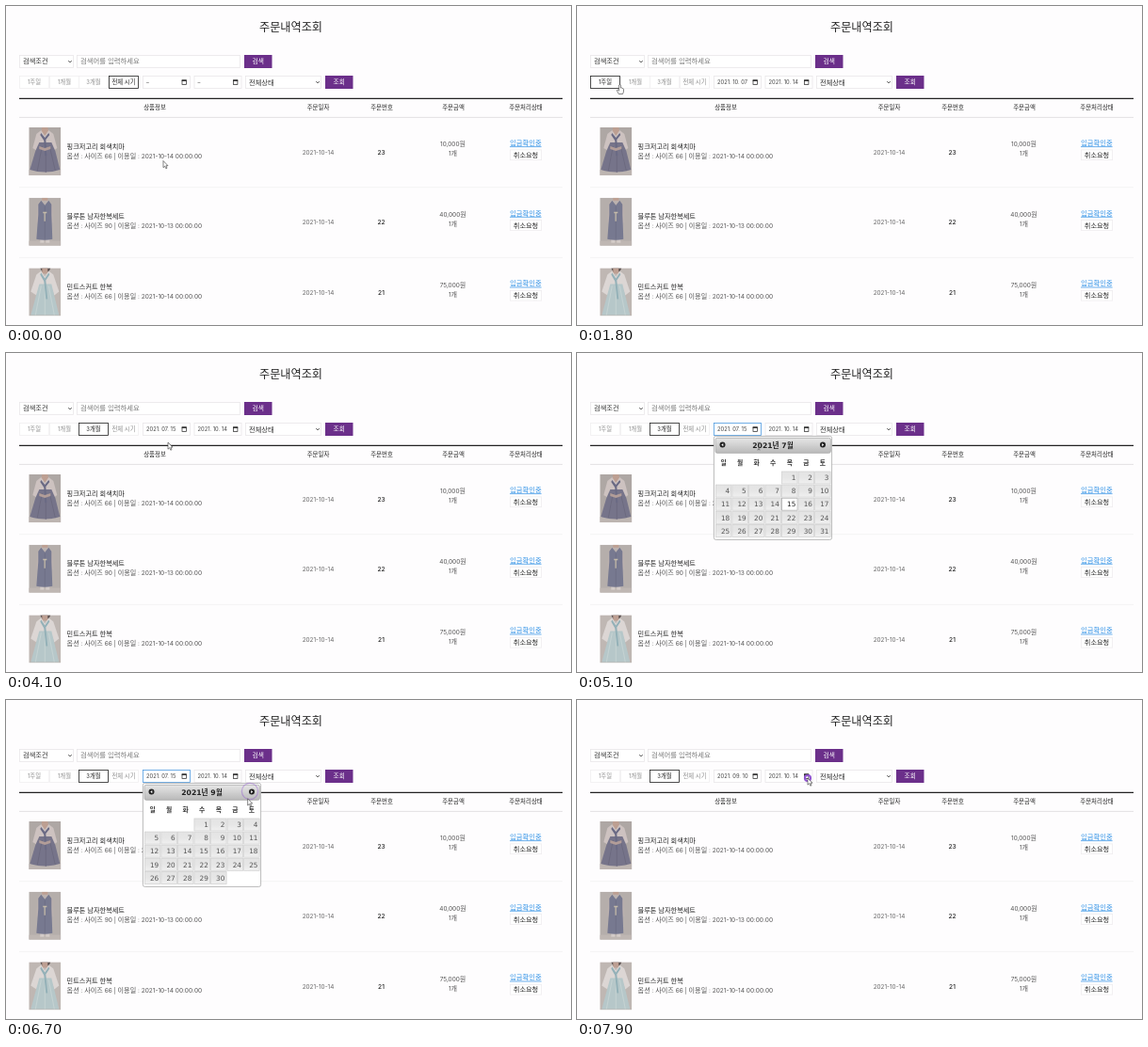
An HTML page for the animation above (8000 ms loop, 600 by 339 pixels).

```html
<!DOCTYPE html>
<html lang="ko">
<head>
<meta charset="utf-8">
<title>주문내역조회</title>
<style>
html, body { margin: 0; width: 100%; height: 100%; overflow: hidden; background: #fefdfe; }
svg { display: block; width: 100%; height: 100%; }
text { white-space: pre; font-family: "Noto Sans CJK KR", "Noto Sans CJK", sans-serif; }
.latin { font-family: Inter, "Noto Sans CJK KR", sans-serif; }
.cal, .cal .latin { font-family: "DejaVu Sans", "Noto Sans CJK KR", sans-serif; }
</style>
</head>
<body>
<svg id="stage" viewBox="0 0 600 339">
  <defs>
    <linearGradient id="bar" x2="0" y2="1">
      <stop offset="0" stop-color="#e6e6e6"/><stop offset="1" stop-color="#b9b9b9"/>
    </linearGradient>
    <linearGradient id="cell" x2="0" y2="1">
      <stop offset="0" stop-color="#e4e4e4"/><stop offset=".5" stop-color="#e6e6e6"/><stop offset="1" stop-color="#f0f0f0"/>
    </linearGradient>
    <clipPath id="crop"><rect width="34" height="51"/></clipPath>
  </defs>
</svg>
<script>
const LOOP = 8000, STEP = 100;
const INK = '#222', GREY = '#666', PALE = '#e9e7e9', PURPLE = '#6b2f8a';
const stage = document.getElementById('stage');

function add(parent, tag, attrs = {}) {
  const el = document.createElementNS('http://www.w3.org/2000/svg', tag);
  for (const key in attrs) el.setAttribute(key, attrs[key]);
  parent.appendChild(el);
  return el;
}

// Latin runs are set a little smaller than Hangul
function fillText(el, str, size, ratio = 0.915) {
  el.textContent = '';
  for (const run of str.match(/[가-힣]+|[^가-힣]+/g) || []) {
    const latin = !/[가-힣]/.test(run);
    add(el, 'tspan', latin ? { class: 'latin', 'font-size': size * ratio } : {}).textContent = run;
  }
}

function label(parent, x, y, str, size, fill = INK, attrs = {}) {
  const el = add(parent, 'text', { x, y, 'font-size': size, fill, ...attrs });
  fillText(el, str, size, attrs.class === 'cal' ? 1 : undefined);
  return el;
}
const centered = (parent, x, y, str, size, fill, attrs) =>
  label(parent, x, y, str, size, fill, { 'text-anchor': 'middle', ...attrs });

const box = (parent, x, y, width, height, fill = 'none', stroke = 'none', attrs) =>
  add(parent, 'rect', { x, y, width, height, fill, stroke, 'stroke-width': 0.8, ...attrs });
const shape = (parent, d, fill, attrs) => add(parent, 'path', { d, fill, ...attrs });
const rule = (y, stroke, width) =>
  add(stage, 'path', { d: `M14 ${y}H591`, stroke, 'stroke-width': width });
const chevron = (x, y) =>
  shape(stage, `M${x - 1.7} ${y - 0.9}l1.7 1.8l1.7-1.8`, 'none', { stroke: INK, 'stroke-width': 0.8 });

function action(x, y, w, str) {
  box(stage, x, y, w, 14, PURPLE);
  centered(stage, x + w / 2, y + 9.2, str, 6.7, '#fff');
}

// Search form
centered(stage, 302.5, 26.7, '주문내역조회', 12.15);
box(stage, 14.5, 52.5, 57, 13, '#fff', PALE);
label(stage, 18, 61.4, '검색조건', 7.25, '#333');
chevron(68, 59);
box(stage, 75.5, 52.5, 173, 13, '#fff', PALE);
label(stage, 79, 61.4, '검색어를 입력하세요', 7.35, '#777');
action(253, 52, 29.5, '검색');

const tabs = [['1주일', 14], ['1개월', 46], ['3개월', 77], ['전체 시기', 109]].map(([str, x]) => ({
  frame: box(stage, x + 0.5, 74.5, 31, 13, '#fff', PALE),
  text: centered(stage, x + 16, 83.3, str, 6.35)
}));

function dateField(x) {
  const frame = box(stage, x + 0.5, 74.5, 50, 13, '#fff', PALE);
  const text = label(stage, x + 4, 83.1, '', 6.3, '#444');
  box(stage, x + 42, 79, 4.4, 4.4, 'none', INK, { 'stroke-width': 0.7 });
  shape(stage, `M${x + 41.7} 78.4h5v1.4h-5z`, INK);
  return { frame, text };
}
const from = dateField(145), to = dateField(199.5);

box(stage, 254.5, 74.5, 80, 13, '#fff', PALE);
label(stage, 258, 83.6, '전체상태', 7.25, '#333');
chevron(331, 81);
action(339, 74, 29.5, '조회');

// Order table
rule(98.4, INK, 1.2);
[['상품정보', 158], ['주문일자', 331.5], ['주문번호', 399], ['주문금액', 475], ['주문처리상태', 552]]
  .forEach(([str, x]) => centered(stage, x, 110.2, str, 6.45, INK, { 'font-weight': 500 }));
rule(118.4, '#dddbdd', 0.8);

const photos = [
  g => {
    box(g, 0, 0, 34, 51, '#aea7a4');
    box(g, 0, 45, 34, 6, '#bdb5b1');
    shape(g, 'M14 0h6l1 5l-4 4l-4-4z', '#bd9f92');
    shape(g, 'M13 3L8 7L4 22l5 3l4-9h9l4 9l4-3L26 7L21 3l-4 6z', '#cdc2c0');
    shape(g, 'M11 16h13l4 9l5 20Q17 50 1 45L7 25z', '#76748a');
    shape(g, 'M14 20L9 46M18 20v28M22 20l6 26', 'none', { stroke: '#6a687d', 'stroke-width': 0.8 });
    shape(g, 'M13 6l4 5l4-5l1 2l-4 5l1 17h-2l-1-16l-4-6z', '#6a6a84');
    shape(g, 'M11 20l6 2l6-2v3l-6 2l-6-2z', '#b29d98');
  },
  g => {
    box(g, 0, 0, 34, 51, '#b5aeab');
    box(g, 0, 46, 34, 5, '#bfb7b3');
    shape(g, 'M14 0h6v6h-6z', '#bd9f92');
    shape(g, 'M12 3L9 7L8 26l4 2L22 28l4-2L25 7L21 3z', '#bbb1ae');
    shape(g, 'M12 43h4v5h-4zM18 43h4v5h-4z', '#d3cbc8');
    shape(g, 'M13 3l4 5l4-5l3 4v11l1 26Q17 46 8 44l2-26V7z', '#777990');
    shape(g, 'M17 9v35', 'none', { stroke: '#6a6c83', 'stroke-width': 0.7 });
    shape(g, 'M15 15h4v1.6h-4zM16.2 16h1.3v9h-1.3z', '#c5bba9');
  },
  g => {
    box(g, 0, 0, 34, 51, '#bfb7b3');
    shape(g, 'M12 0h11l-2 4h-7z', '#5b5050');
    shape(g, 'M14 0h6v6h-6z', '#bd9f92');
    shape(g, 'M13 3L8 7L2 25l6 4l4-11h11l4 11l5-4L26 7L21 3l-4 6z', '#dcd6d4');
    shape(g, 'M11 17h13l8 33H2z', '#b6c7c9');
    shape(g, 'M13 19L7 50M17 19v31M21 19l6 31', 'none', { stroke: '#c6d3d3', 'stroke-width': 1 });
    shape(g, 'M13 5l4 6l4-6l1 2l-4 6l2 20h-2l-2-19l-4-7z', '#94b1b8');
  }
];

const orders = [
  ['핑크저고리 회색치마', 66, 14, '23', '10,000원'],
  ['블루톤 남자한복세트', 90, 13, '22', '40,000원'],
  ['민트스커트 한복', 66, 14, '21', '75,000원']
];
orders.forEach(([name, size, day, no, price], i) => {
  const row = add(stage, 'g', { transform: `translate(0 ${i * 74.7})` });
  photos[i](add(row, 'g', { transform: 'translate(24.3 129)', 'clip-path': 'url(#crop)' }));
  label(row, 64.6, 151.6, name, 7.2);
  label(row, 64.6, 161.5, `옵션 : 사이즈 ${size} | 이용일 : 2021-10-${day} 00:00:00`, 7.12, '#555');
  centered(row, 331.5, 157.6, '2021-10-14', 7, GREY);
  centered(row, 398.5, 157.8, no, 7.2, INK, { 'font-weight': 500 });
  centered(row, 474.5, 149.2, price, 7.05, '#555');
  centered(row, 474.5, 159.2, '1개', 7.05, '#555');
  centered(row, 552, 148.1, '입금확인중', 7.35, '#2a8fe6');
  add(row, 'path', { d: 'M535 149.6h33.6', stroke: '#2a8fe6', 'stroke-width': 0.7 });
  box(row, 535.4, 152.9, 33.2, 10.8, '#fff', '#efedef');
  centered(row, 552, 160.9, '취소요청', 7.2);
});
rule(192.7, '#f3f1f3', 0.8);
rule(267.4, '#f3f1f3', 0.8);

// Date picker
const picker = add(stage, 'g');
box(picker, 145.4, 88.4, 125.2, 110, '#fff', '#aaa', { rx: 2 });
box(picker, 147, 90.3, 122.4, 16, 'url(#bar)', '#aaa', { rx: 1.8 });
const hover = box(picker, 255, 91.6, 12.2, 12.4, '#f2f2f2', '#999', { rx: 1.8 });
[[154.5, -1], [261, 1]].forEach(([x, dir]) => {
  add(picker, 'circle', { cx: x, cy: 97.6, r: 3, fill: INK });
  shape(picker, `M${x - 0.8 * dir} 95.9l${2 * dir} 1.7l${-2 * dir} 1.7z`, '#fff');
});
const heading = centered(picker, 208, 100.8, '', 7.7, INK, { class: 'cal', 'font-weight': 700 });
[...'일월화수목금토'].forEach((d, i) =>
  centered(picker, 155.6 + i * 17.55, 118.8, d, 6.8, '#333', { 'font-weight': 700 }));
const days = add(picker, 'g');

let shown = '';
function fillMonth(month, active) {
  const key = month + '/' + active;
  if (key === shown) return;
  shown = key;
  fillText(heading, `2021년 ${month}월`, 7.7, 1);
  days.textContent = '';
  const first = new Date(2021, month - 1, 1).getDay();
  const count = new Date(2021, month, 0).getDate();
  for (let d = 1; d <= count; d++) {
    const slot = first + d - 1;
    const x = 147.3 + (slot % 7) * 17.55, y = 126 + Math.floor(slot / 7) * 14.1;
    const on = d === active;
    box(days, x, y, 16.6, 13, on ? '#fff' : 'url(#cell)', on ? '#aaa' : '#d3d3d3');
    label(days, x + 14.9, y + 9.2, String(d), 7.3, on ? INK : '#555', { class: 'cal', 'text-anchor': 'end' });
  }
}

// Pointer
const ring = add(stage, 'circle', { fill: 'none', stroke: '#8d4fd0' });
const pointer = add(stage, 'g');
const pen = { stroke: '#333', 'stroke-width': 0.6, 'stroke-linejoin': 'round' };
const cursors = {
  arrow: shape(pointer, 'M0 0V7.2L1.7 5.7L2.8 8.2L4 7.7L2.9 5.2H5z', '#fff', pen),
  hand: shape(pointer, 'M-.9 .4Q0-.6 .9 .4V3.6Q2 3 2.6 4Q3.6 3.7 4 4.8V7.4L3.1 10H-1.2L-3 6.6Q-3.2 5.2-2 5.6L-.9 6.6z', '#fff', pen),
  beam: shape(pointer, 'M-1.5-4Q0-4 0-3V3Q0 4-1.5 4M1.5-4Q0-4 0-3M0 3Q0 4 1.5 4', 'none', { stroke: '#555', 'stroke-width': 0.7 })
};

// [time, x, y]
const path = [
  [200, 167, 164.5], [1000, 31, 84], [1500, 31, 84], [1800, 45.5, 83.5], [2100, 62, 83.5],
  [2400, 62, 83.5], [2800, 88, 82.5], [3700, 88, 82.5], [4100, 172, 95], [4300, 189, 82],
  [4800, 189, 82], [5100, 193, 99], [5300, 193, 99], [5700, 259, 97], [6600, 259, 97],
  [7000, 244, 147], [7100, 244, 147], [7300, 238, 100], [7700, 245, 83]
];
const clicks = [1300, 2200, 3200, 4500, 5700, 6400, 7100, 7900];

const clamp = v => Math.min(1, Math.max(0, v));
const ease = p => p * p * (3 - 2 * p);

function position(t) {
  const next = path.findIndex(p => p[0] > t);
  if (next === 0) return path[0].slice(1);
  if (next < 0) return path[path.length - 1].slice(1);
  const a = path[next - 1], b = path[next];
  const p = ease((t - a[0]) / (b[0] - a[0]));
  return [a[1] + (b[1] - a[1]) * p, a[2] + (b[2] - a[2]) * p];
}

// Value of the last [time, value] entry reached
const at = (t, list) => list.filter(e => e[0] <= t).pop()[1];

function draw(t) {
  const tab = at(t, [[0, 3], [1400, 0], [2300, 1], [3300, 2]]);
  tabs.forEach(({ frame, text }, i) => {
    frame.setAttribute('stroke', i === tab ? INK : '#f1eff1');
    text.setAttribute('fill', i === tab ? INK : '#8c8c8c');
  });
  stage.insertBefore(tabs[tab].frame, tabs[tab].text);

  const start = at(t, [[0, '–'], [1400, '2021. 10. 07'], [2300, '2021. 09. 14'], [3300, '2021. 07. 15'], [7200, '2021. 09. 10']]);
  fillText(from.text, start, 6.3);
  fillText(to.text, tab === 3 ? '–' : '2021. 10. 14', 6.3);
  from.frame.setAttribute('stroke', t >= 4500 && t < 7200 ? '#4f9be0' : PALE);

  const fade = t < 7100 ? clamp((t - 4600) / 300) : clamp((7400 - t) / 300);
  picker.setAttribute('opacity', fade);
  const month = at(t, [[0, 7], [5800, 8], [6500, 9]]);
  fillMonth(month, month === 7 ? 15 : t >= 7000 && t < 7200 ? 10 : 0);
  hover.setAttribute('opacity', t >= 5700 && t < 6700 ? 1 : 0);

  const [x, y] = position(t);
  pointer.setAttribute('transform', `translate(${x} ${y})`);
  const kind = at(t, [[0, 'arrow'], [1000, 'hand'], [3900, 'arrow'], [5000, 'beam'], [5400, 'arrow'], [6900, 'hand'], [7200, 'arrow']]);
  for (const name in cursors) cursors[name].setAttribute('opacity', name === kind ? 1 : 0);

  const click = clicks.filter(c => c <= t && t < c + 400).pop();
  ring.setAttribute('opacity', 0);
  if (click !== undefined) {
    const p = (t - click) / 400, [cx, cy] = position(click);
    ring.setAttribute('cx', cx);
    ring.setAttribute('cy', cy);
    ring.setAttribute('r', 3 + 7.5 * p);
    ring.setAttribute('stroke-width', 2.2 - 1.2 * p);
    ring.setAttribute('opacity', 0.95 - 0.75 * p);
  }
}

const origin = performance.now();
function tick() {
  const t = (performance.now() - origin) % LOOP;
  draw(Math.floor(t / STEP) * STEP);
  requestAnimationFrame(tick);
}
tick();
</script>
</body>
</html>
```
